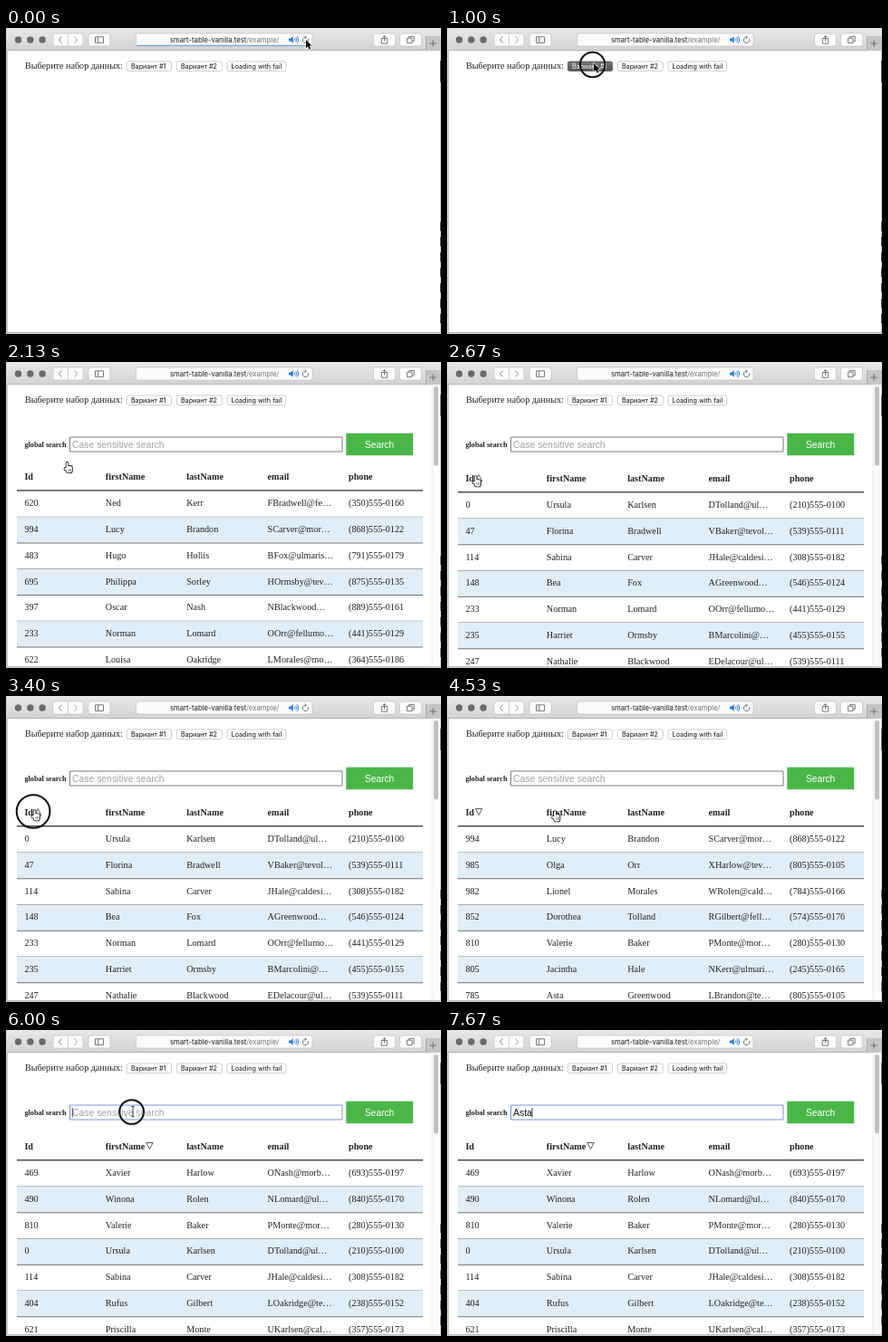
Recreate the animation shown at these times as an HTML page with a canvas. Size 480x338 px, loop 8000 ms.

```html
<!DOCTYPE html>
<html lang="ru">
<head>
<meta charset="utf-8">
<title>Smart table</title>
<style>
  html, body { margin: 0; width: 100%; height: 100%; overflow: hidden; background: #fff; }
  canvas { display: block; width: 480px; height: 338px; }
</style>
</head>
<body>
<canvas id="stage"></canvas>
<script>
const LOOP = 8000;
const canvas = document.getElementById('stage');
const ctx = canvas.getContext('2d');
const dpr = window.devicePixelRatio || 1;
canvas.width = 480 * dpr;
canvas.height = 338 * dpr;

const SERIF = '"Liberation Serif", serif';
const SANS = '"Liberation Sans", sans-serif';
const UI = 'Inter, sans-serif';

const names = `620 Ned Kerr, 994 Lucy Brandon, 483 Hugo Hollis, 695 Philippa Sorley,
397 Oscar Nash, 233 Norman Lomard, 622 Louisa Oakridge, 0 Ursula Karlsen, 47 Florina Bradwell,
114 Sabina Carver, 148 Bea Fox, 235 Harriet Ormsby, 247 Nathalie Blackwood, 985 Olga Orr,
982 Lionel Morales, 852 Dorothea Tolland, 810 Valerie Baker, 805 Jacintha Hale,
785 Asta Greenwood, 367 Bernadine Marcolini, 410 Eleanora Delacour, 469 Xavier Harlow,
490 Winona Rolen, 404 Rufus Gilbert, 621 Priscilla Monte`.split(/,\s/).map(s => s.split(' '));

const domains = ['fellumora.org', 'morbunate.com', 'ulmaris.edu', 'tevolente.net', 'caldesio.org'];

function ellipsis(str, size, font, room) {
  ctx.font = `${size}px ${font}`;
  if (ctx.measureText(str).width <= room) return str;
  while (ctx.measureText(str + '…').width > room) str = str.slice(0, -1);
  return str + '…';
}

const people = names.map(([id, first, last], i) => {
  const other = names[(i + 8) % names.length];
  const email = `${other[1][0]}${other[2]}@${domains[i % domains.length]}`;
  const phone = `(${210 + id * 7 % 700})555-01${String(id * 13 % 100).padStart(2, '0')}`;
  return [id, first, last, ellipsis(email, 10.2, SERIF, 73), phone];
});

const byId = [...people].sort((a, b) => a[0] - b[0]);
const byName = [...people].sort((a, b) => (a[1] < b[1] ? -1 : 1));

const headers = ['Id', 'firstName', 'lastName', 'email', 'phone'];
const columnX = i => 20.4 + i * 89.4;
const ROW = 28.75, HEAD = 144.3;

// Each click makes the table busy for a while, then shows its rows
const actions = [
  { click: 995, busy: 1150, done: 1400, rows: people, dir: 0 },
  { click: 2530, busy: 2660, done: 2660, rows: byId, col: 0, dir: 1 },
  { click: 3325, busy: 3520, done: 3520, rows: [...byId].reverse(), col: 0, dir: -1 },
  { click: 4595, busy: 4660, done: 4860, rows: byName, col: 1, dir: 1 },
  { click: 5195, busy: 5200, done: 5530, rows: [...byName].reverse(), col: 1, dir: -1 }
];
const FOCUS = 6000, TYPING = 7130, KEY_GAP = 172, BLINK = 465;
const WORD = 'Asta';
const latest = (key, t) => actions.filter(a => a[key] <= t).pop();

const clamp = v => Math.max(0, Math.min(1, v));
const easeBoth = u => u * u * (3 - 2 * u);
const easeOut = u => 1 - (1 - u) ** 2;

const moves = [
  { start: 70, end: 870, bend: [235, 84], to: [162, 39] },
  { start: 1730, end: 2530, bend: [106, 100], to: [31.5, 126], ease: easeOut },
  { start: 3730, end: 4530, bend: [75, 100], to: [119, 127] },
  { start: 4730, end: 5000, bend: [127, 124], to: [134, 125] },
  { start: 5600, end: FOCUS, bend: [134, 105], to: [140, 89] }
];

function cursorAt(t) {
  let pos = [331, 13];
  for (const { start, end, bend, to, ease = easeBoth } of moves) {
    const u = ease(clamp((t - start) / (end - start)));
    pos = pos.map((p, i) => (1 - u) ** 2 * p + 2 * u * (1 - u) * bend[i] + u * u * to[i]);
  }
  return pos;
}

function panelAlpha(t) {
  const { busy, done } = latest('busy', t);
  if (busy === done) return 1;
  return 1 - 0.72 * Math.min(clamp((t - busy) / 120), clamp((done + 130 - t) / 130));
}

function text(str, x, y, size, font, color = '#222', weight = '') {
  ctx.font = `${weight} ${size}px ${font}`;
  ctx.fillStyle = color;
  ctx.fillText(str, x, y);
  return ctx.measureText(str).width;
}

function rect(x, y, w, h, fill) {
  ctx.fillStyle = fill;
  ctx.fillRect(x, y, w, h);
}

function outline(color, width) {
  ctx.strokeStyle = color;
  ctx.lineWidth = width;
  ctx.stroke();
}

function box(x, y, w, h, r, fill, stroke, width = 0.7) {
  ctx.beginPath();
  ctx.roundRect(x, y, w, h, r);
  ctx.fillStyle = fill;
  ctx.fill();
  if (stroke) outline(stroke, width);
}

function line(points, color, width) {
  ctx.beginPath();
  points.forEach(p => ctx.lineTo(...p));
  outline(color, width);
}

function arc(x, y, r, from, to, color, width) {
  ctx.beginPath();
  ctx.arc(x, y, r, from, to);
  outline(color, width);
}

function vGrad(y0, y1, top, bottom) {
  const g = ctx.createLinearGradient(0, y0, 0, y1);
  g.addColorStop(0, top);
  g.addColorStop(1, bottom);
  return g;
}

function drawFrame() {
  rect(0, 0, 480, 338, '#d5d5d5');
  rect(1.5, 25, 478, 311.5, '#fff');
  rect(0.8, 25, 0.8, 312, '#a9a9a9');
  rect(1, 336.3, 479, 0.8, '#a9a9a9');
  rect(479, 25, 1, 312, '#c9c9c9');
  rect(479, 36, 1, 24, '#444');
  for (let y = 214; y < 330; y += 17) rect(479, y, 1, 10, '#444');
}

const toolButton = (x, w) => box(x, 6, w, 14, 2.5, '#fbfbfb', '#c4c2c4');

function drawAddress(t) {
  toolButton(143.5, 194.5);
  if (t < 270) rect(144.5, 18.8, 190, 1.2, '#6fa8ea');
  const host = text('smart-table-vanilla.test', 181, 16, 7.7, UI, '#1c1c1c');
  text('/example/', 181 + host, 16, 7.7, UI, '#777');

  const blue = '#2a7de0';
  rect(312, 11.6, 2.5, 2.8, blue);
  ctx.beginPath();
  ctx.moveTo(312.4, 13);
  ctx.lineTo(316.8, 9.3);
  ctx.lineTo(316.8, 16.7);
  ctx.fill();
  for (let r = 2; r < 6; r += 1.9) arc(316.8, 13, r, -0.75, 0.75, blue, 0.9);
  arc(330.5, 13.4, 3.2, -0.4, 4.9, '#666', 0.9);
  line([[329.6, 8.6], [331.6, 10.3], [329.6, 12]], '#666', 0.8);
}

function drawToolbar(t) {
  const ink = '#6e6e6e';
  box(1, 0, 479, 25, [4, 0, 0, 0], vGrad(0, 25, '#e9e7e9', '#d4d2d4'));
  rect(1, 24.3, 479, 0.9, '#b3b1b3');
  for (let i = 0; i < 3; i++) box(9.8 + i * 13.3, 9.3, 7.4, 7.4, 3.7, '#6a6a6a');

  toolButton(52, 33);
  rect(68.2, 6, 0.7, 14, '#c4c2c4');
  line([[61.5, 9.5], [58.5, 13], [61.5, 16.5]], '#8a8a8a', 1);
  line([[75.5, 9.5], [78.5, 13], [75.5, 16.5]], '#a5a5a5', 1);
  toolButton(91, 24);
  box(98.5, 9.8, 9, 6.6, 0, '#fbfbfb', ink, 0.9);
  rect(101.3, 9.8, 0.9, 6.6, ink);

  drawAddress(t);

  toolButton(405.5, 24);
  box(414.3, 11.5, 6.4, 5.7, 0, '#fbfbfb', ink, 0.9);
  line([[417.5, 14.5], [417.5, 8.8]], ink, 0.9);
  line([[415.6, 10.5], [417.5, 8.5], [419.4, 10.5]], ink, 0.9);
  toolButton(434.5, 24);
  box(444.8, 9.4, 5.4, 5.4, 0, '#fbfbfb', ink, 0.9);
  box(442.6, 11.2, 5.4, 5.4, 0, '#fbfbfb', ink, 0.9);

  rect(463, 9, 17, 16, '#c6c4c6');
  rect(463, 9, 0.8, 16, '#aaa8aa');
  rect(467.4, 16.6, 7.4, 0.9, '#666');
  rect(470.7, 13.3, 0.9, 7.4, '#666');
}

function drawButton(x, w, label, pressed) {
  const fill = pressed ? vGrad(37, 48, '#777', '#505050') : '#fff';
  box(x, 37, w, 10.6, 2, fill, pressed ? '#4a4a4a' : '#bcbcbc');
  text(label, x + 4.6, 44.8, 7.2, UI, pressed ? '#fff' : '#111');
}

function drawSearch(t) {
  text('global search', 20.5, 94.4, 8.2, SERIF, '#222', 'bold');
  const focused = t >= FOCUS;
  box(70.5, 83, 300.5, 16, 0, '#fff', focused ? '#7d95d4' : '#7d7d7d', 1);
  const typed = WORD.slice(0, Math.max(0, Math.floor((t - TYPING) / KEY_GAP) + 1));
  let caretX = 72.8;
  if (typed) caretX += text(typed, 73, 94.8, 10.4, SANS, '#111');
  else text('Case sensitive search', 73, 94.8, 10.4, SANS, '#a3a3a3');
  const blinkOn = Math.floor((t - FOCUS) / BLINK) % 2 === 0;
  if (focused && (typed || blinkOn)) rect(caretX, 86, 0.8, 10.5, '#111');
  rect(375.3, 78.7, 73.9, 24.5, '#4ab648');
  text('Search', 396, 94.6, 10.2, SANS, '#fff');
}

function drawSortMark(x, y, dir) {
  const half = 3.5 * dir;
  ctx.beginPath();
  ctx.moveTo(x, y + half);
  ctx.lineTo(x + 7.4, y + half);
  ctx.lineTo(x + 3.7, y - half);
  ctx.closePath();
  outline('#333', 0.8);
}

function drawTable(t) {
  const { col, dir } = latest('busy', t);
  const shown = latest('done', t);
  // The sort mark makes the header row a little taller
  const lift = dir ? 0 : 1.8;
  headers.forEach((name, i) => {
    const w = text(name, columnX(i), 131.8 - lift, 10.2, SERIF, '#222', 'bold');
    if (i === col) drawSortMark(columnX(i) + w + 1.4, 128, dir);
  });
  const rows = shown ? shown.rows.slice(0, 7) : [];
  rows.forEach((row, i) => {
    const y = HEAD - lift + i * ROW;
    if (i % 2) rect(12, y, 448, ROW, '#e1eef8');
    row.forEach((cell, c) => text(cell, columnX(c), y + 16.8, 10.2, SERIF));
    rect(12, y + ROW - 0.4, 448, 0.8, '#555');
  });
  rect(12, HEAD - lift - 1.2, 448, 1.3, '#333');
}

function drawPage(t) {
  text('Выберите набор данных:', 21, 45, 10.15, SERIF);
  const { click, busy, done } = actions[0];
  drawButton(133.3, 49.2, 'Вариант #1', t >= click && t < click + 135);
  drawButton(188.3, 50, 'Вариант #2');
  drawButton(244, 64.8, 'Loading with fail');
  if (t < busy) return;
  ctx.save();
  ctx.beginPath();
  ctx.rect(2, 25, 468, 311.3);
  ctx.clip();
  ctx.globalAlpha = panelAlpha(t);
  drawSearch(t);
  drawTable(t);
  ctx.restore();
  if (t < done) return;
  rect(469.8, 25.2, 9.4, 311, '#fafafa');
  rect(469.8, 25.2, 0.6, 311, '#e6e6e6');
  box(472, 27, 5, 87.5, 2.5, '#c1c1c1');
}

function drawArrow() {
  ctx.beginPath();
  [[0, 0], [0, 9.2], [2.1, 7.3], [3.6, 10.8], [5.2, 10.1], [3.8, 6.7], [6.5, 6.6]]
    .forEach(p => ctx.lineTo(...p));
  ctx.closePath();
  outline('#fff', 1.1);
  ctx.fillStyle = '#000';
  ctx.fill();
}

function drawHand() {
  ctx.beginPath();
  ctx.roundRect(-0.9, 0, 1.9, 9, 0.9);
  ctx.roundRect(-0.9, 4, 6.4, 7.4, 2);
  ctx.roundRect(-3, 5.8, 4, 2.6, 1.2);
  outline('#111', 1.6);
  ctx.fillStyle = '#fff';
  ctx.fill();
  for (let x = 1.2; x < 5; x += 1.5) rect(x, 7.2, 0.6, 2.6, '#444');
}

function drawBeam() {
  rect(-0.4, -4.5, 0.9, 11, '#222');
  for (const y of [-5, 6.4]) rect(-1.8, y, 3.7, 0.8, '#222');
}

function drawPointer(t) {
  const lastAction = latest('click', t);
  const click = t >= FOCUS ? FOCUS : lastAction ? lastAction.click : -LOOP;
  const since = t - click;
  ctx.save();
  ctx.translate(...cursorAt(t));
  if (since < 135) arc(-1.4, 1.5, 13.3 + since / 15, 0, 7, '#111', 2);
  if (t < 1900) drawArrow();
  else if (t < FOCUS - 100) drawHand();
  else if (t < TYPING) drawBeam();
  ctx.restore();
}

function render(t) {
  ctx.setTransform(dpr, 0, 0, dpr, 0, 0);
  drawFrame();
  drawToolbar(t);
  drawPage(t);
  drawPointer(t);
}

const begin = performance.now();
function tick() {
  render((performance.now() - begin) % LOOP);
  requestAnimationFrame(tick);
}
tick();
</script>
</body>
</html>
```
